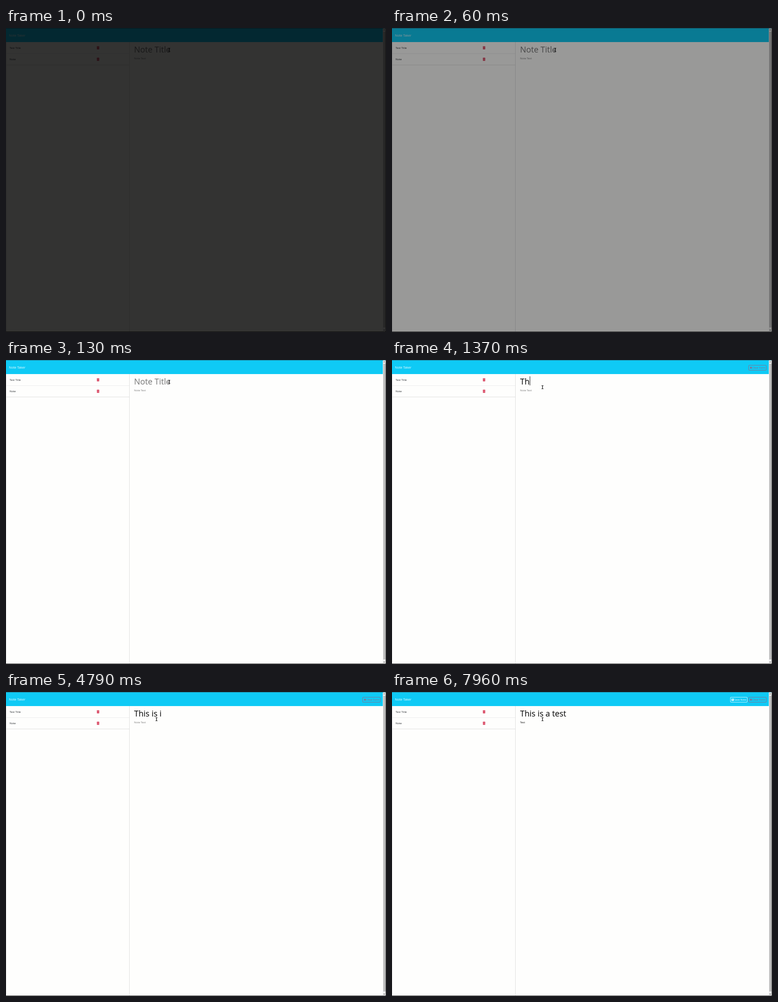
An HTML page with a canvas for the animation above (8000 ms loop, 836x670 px).

```html
<!DOCTYPE html>
<html lang="en">
<head>
<meta charset="utf-8">
<title>Note Taker</title>
<style>
  html, body { margin: 0; width: 100%; height: 100%; overflow: hidden; background: #000; }
  canvas { display: block; }
</style>
</head>
<body>
<canvas id="stage" width="836" height="670"></canvas>
<script>
const ctx = document.getElementById('stage').getContext('2d');
const LOOP = 8000;
const CYAN = '#0fcaf5', RED = '#d32d4c', GREY = '#757575', LINE = '#dedede';
const TITLE_SIZE = 17.8, TEXT_SIZE = 5.8;

// Each step: start time, brightness
const fade = [[0, .2], [30, .4], [60, .6], [100, .8], [130, 1]];

// Each step: start time, typed text, caret shown
const titleSteps = [
  [0, '', false], [860, '', true], [1130, 'T', true], [1340, 'Th', true],
  [1720, 'Thi', false], [1780, 'This', false], [1840, 'This ', false],
  [1900, 'This i', false], [1960, 'This is', false],
  [2790, 'This isi', false], [2860, 'This isi', true], [3000, 'This isi', false],
  [3170, 'This is', false], [3400, 'This is ', false], [3540, 'This is i', true],
  [3680, 'This is is', true], [3890, 'This is is ', true], [4620, 'This is is ', false],
  [4790, 'This is i', false], [4930, 'This is ', false], [5050, 'This is a', false],
  [5170, 'This is a ', true], [5290, 'This is a t', true], [5410, 'This is a te', true],
  [5580, 'This is a tes', true], [5750, 'This is a test', true], [6200, 'This is a test', false]
];
const bodySteps = [
  [0, '', false], [6240, '', true], [6790, '', false], [7060, 'T', true],
  [7180, 'Te', true], [7300, 'Tes', true], [7420, 'Test', true], [7960, 'Test', false]
];

const stepAt = (steps, t) => steps.findLast(step => step[0] <= t);
const clamp = v => Math.max(0, Math.min(1, v));

function rect(x, y, w, h, color) {
  ctx.fillStyle = color;
  ctx.fillRect(x, y, w, h);
}

function text(str, x, y, size, color) {
  ctx.font = `${size}px "Open Sans", "Noto Sans", sans-serif`;
  ctx.fillStyle = color;
  ctx.fillText(str, x, y);
}

function outline(x, y, w, h, color) {
  ctx.strokeStyle = color;
  ctx.lineWidth = .8;
  ctx.beginPath();
  ctx.roundRect(x + .5, y + .5, w - 1, h - 1, 1.5);
  ctx.stroke();
}

function trash(x, y) {
  rect(x, y + .6, 6, 1, RED);
  rect(x + 2, y, 2, 1, RED);
  rect(x + .5, y + 2, 5, 5, RED);
  for (let i = 0; i < 3; i++) rect(x + 1.4 + i * 1.3, y + 2.7, .5, 3.4, '#f3bcc6');
}

function triangle(x, y, dir) {
  ctx.fillStyle = '#505050';
  ctx.beginPath();
  ctx.moveTo(x - 2, y + dir);
  ctx.lineTo(x + 2, y + dir);
  ctx.lineTo(x, y - dir);
  ctx.fill();
}

function page() {
  rect(0, 0, 836, 670, '#fefefd');
  rect(0, 0, 829, 31, CYAN);
  rect(0, 0, 836, 1, '#24788c');
  text('Note Taker', 6.5, 18.6, 7.2, '#f4fdff');

  rect(0, 31, 1, 638, LINE);
  rect(271, 31, 1, 638, LINE);
  rect(1, 56, 270, 1, '#ececec');
  rect(1, 81, 270, 1, LINE);
  text('Test Title', 8, 46, 5.9, '#212529');
  text('Note', 8, 71.2, 5.9, '#212529');
  trash(199.5, 40);
  trash(199.5, 65.3);

  rect(829, 1, 7, 668, '#f0f0f0');
  rect(830, 8, 5, 652, '#bdbdbd');
  rect(835, 0, 1, 670, '#5c5c5c');
  triangle(832, 4, 1);
  triangle(832, 666, -1);
  rect(0, 669, 836, 1, '#333');
}

function clearButton(alpha) {
  const color = '#96637f';
  ctx.globalAlpha = alpha;
  outline(784, 11, 40, 12, color);
  ctx.strokeStyle = '#c83f5c';
  ctx.lineWidth = 1.1;
  ctx.beginPath();
  ctx.moveTo(788, 15); ctx.lineTo(791.5, 18.8);
  ctx.moveTo(791.5, 15); ctx.lineTo(788, 18.8);
  ctx.stroke();
  text('Clear Form', 793, 19, 5.5, color);
  ctx.globalAlpha = 1;
}

function saveButton(alpha) {
  ctx.globalAlpha = alpha;
  outline(744, 11, 38, 12, '#f4fdff');
  rect(747, 14.5, 5, 5, '#fff');
  rect(748, 15.2, 2.6, 1.2, CYAN);
  rect(748.8, 17.3, 1.3, 1.3, CYAN);
  text('Save Note', 753.2, 19, 5.5, '#fff');
  ctx.globalAlpha = 1;
}

function field(step, placeholder, baseline, size, caretTop, caretHeight) {
  const [, typed, caret] = step;
  text(typed || placeholder, 281.8, baseline, size, typed ? '#000' : GREY);
  if (caret) rect(Math.round(281.8 + ctx.measureText(typed).width), caretTop, 1, caretHeight, '#111');
}

function pointer(t) {
  const p = clamp((t - 160) / 640);
  const ease = p * p * (3 - 2 * p);
  const x = Math.round(359 - 28 * ease), y = Math.round(48 + 12 * ease);
  rect(x - 1, y - 3, 3, 7, 'rgba(255,255,255,.6)');
  rect(x - .5, y - 3.5, 1.2, 7, '#000');
  rect(x - 2, y - 4, 4.2, 1, '#000');
  rect(x - 2, y + 3, 4.2, 1, '#000');
}

function draw(t) {
  page();
  field(stepAt(titleSteps, t), 'Note Title', 53.6, TITLE_SIZE, 36, 20);
  field(stepAt(bodySteps, t), 'Note Text', 69.2, TEXT_SIZE, 62, 9);
  const clearAlpha = clamp((t - 1130) / 150);
  const saveAlpha = clamp((t - 7060) / 150);
  if (clearAlpha) clearButton(clearAlpha);
  if (saveAlpha) saveButton(saveAlpha);
  pointer(t);
  const shade = 1 - stepAt(fade, t)[1];
  if (shade) rect(0, 0, 836, 670, `rgba(0,0,0,${shade})`);
}

const start = performance.now();
function tick() {
  draw((performance.now() - start) % LOOP);
  requestAnimationFrame(tick);
}
tick();
</script>
</body>
</html>
```
